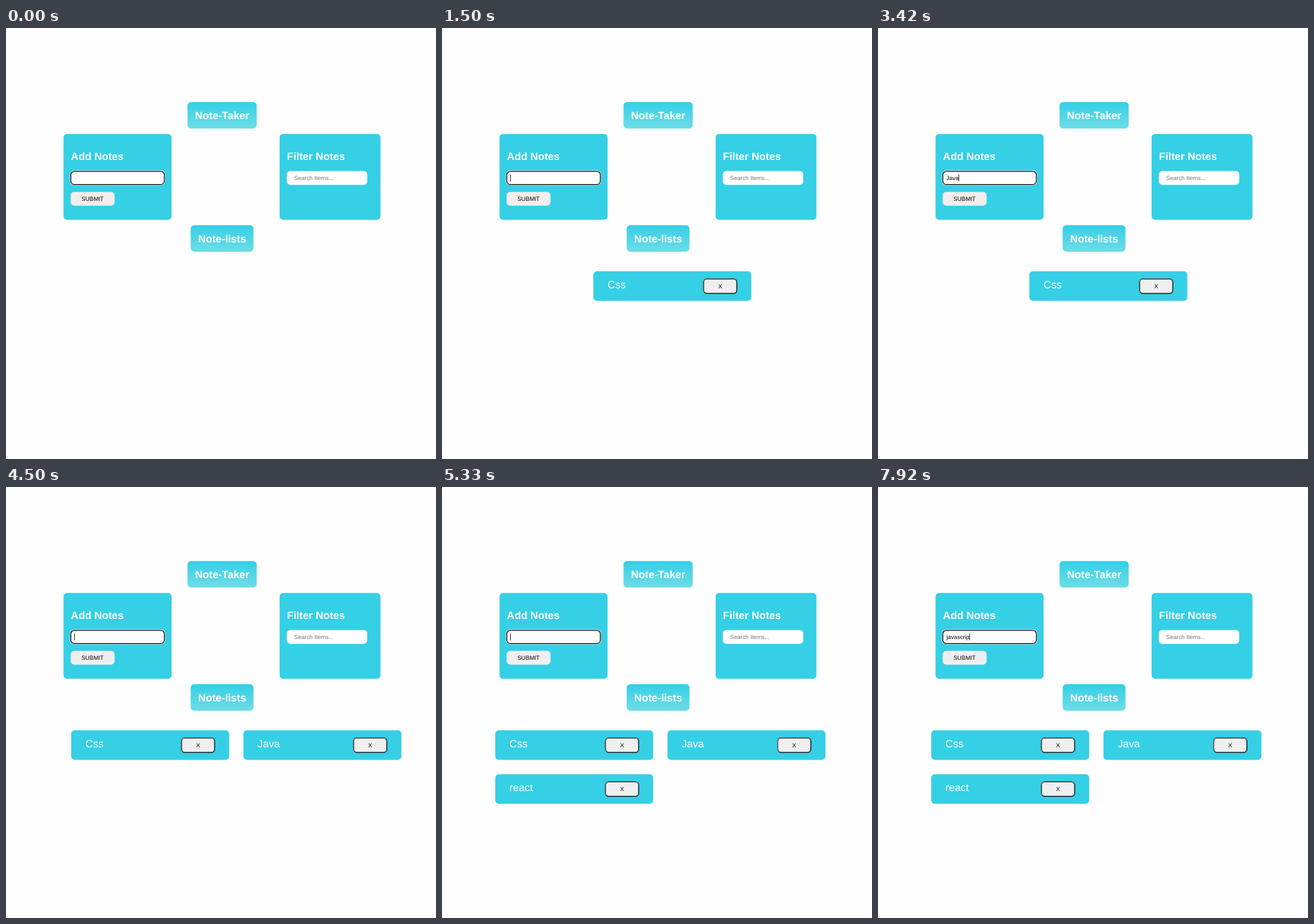
Write an HTML page that moves like this. It is 600x601 px and loops after 8000 ms.

```html
<!DOCTYPE html>
<html lang="en">
<head>
<meta charset="utf-8">
<title>Note-Taker</title>
<style>
  html, body { margin: 0; width: 100%; height: 100%; overflow: hidden; background: #fefefe; }
  svg { display: block; width: 600px; height: 601px; }
  text { font: 8.18px "Liberation Sans", Arial, sans-serif; fill: #000; text-rendering: geometricPrecision; }
  .head { font-size: 14.73px; font-weight: bold; fill: #fff; }
  .note { font-size: 14.73px; fill: #fff; }
  .hint { fill: #757575; }
  .mid { text-anchor: middle; }
  .menu text { font: 9.4px "Noto Sans", sans-serif; fill: #e4e5e5; }
  .panel { fill: #35cfe6; }
  .btn { fill: #efefef; }
</style>
</head>
<body>
<svg viewBox="0 0 600 601">
  <defs>
    <linearGradient id="fade" x2="0" y2="1">
      <stop stop-color="#33cfe6"/>
      <stop offset="1" stop-color="#6edde6"/>
    </linearGradient>
    <filter id="soft" x="-10%" y="-10%" width="120%" height="125%">
      <feDropShadow dx="0" dy="0.8" stdDeviation="0.8" flood-opacity="0.4"/>
    </filter>
  </defs>

  <rect x="253.3" y="103.2" width="96.5" height="37" rx="5" fill="url(#fade)"/>
  <text class="head mid" x="301.6" y="126.7">Note-Taker</text>

  <rect class="panel" x="80.3" y="147.8" width="150.7" height="119.7" rx="5"/>
  <text class="head" x="90.6" y="183.6">Add Notes</text>
  <rect x="89.2" y="198.6" width="133" height="20.9" rx="6" fill="#fff"/>
  <rect x="90.4" y="199.8" width="130.6" height="18.5" rx="5" fill="#fff" stroke="#101010" stroke-width="1.3"/>
  <text id="typed" x="95.4" y="211.9"></text>
  <rect id="caret" y="204.4" width="0.8" height="9.4"/>
  <rect class="btn" x="90.2" y="228.6" width="61.3" height="19.2" rx="5"/>
  <text class="mid" x="120.8" y="241.1">SUBMIT</text>

  <rect class="panel" x="381.8" y="147.8" width="140.7" height="119.7" rx="5"/>
  <text class="head" x="392" y="183.6">Filter Notes</text>
  <rect x="391.8" y="199.4" width="112.3" height="19.4" rx="5" fill="#fff"/>
  <text class="hint" x="402" y="212">Search Items...</text>

  <rect x="257.7" y="275" width="87.7" height="37" rx="5" fill="url(#fade)"/>
  <text class="head mid" x="301.6" y="298.5">Note-lists</text>

  <g id="cards"></g>

  <g id="menu" class="menu">
    <g fill="#262a2b" filter="url(#soft)">
      <path d="M149.4 224.6L155 219L160.6 224.6Z"/>
      <rect id="menuBox" x="142.7" y="224.2" height="49.4" rx="2.5"/>
    </g>
    <text x="150" y="241.9"></text>
    <text x="150" y="263.7"></text>
  </g>
</svg>
<script>
const LOOP = 8000;
const $ = id => document.getElementById(id);
const menus = {
  j: { width: 52, items: ['j', 'jhfguy'] },
  r: { width: 37.5, items: ['r', 'rea'] }
};

// time, typed text, caret shown, menu key, notes in the list
const steps = [
  [0, '', 0, '', 0],
  [500, '', 1, '', 0],
  [750, 'C', 1, '', 0],
  [1000, 'Cs', 1, '', 0],
  [1170, 'Css', 1, '', 0],
  [1500, '', 1, '', 1],
  [1830, '', 0, '', 1],
  [2420, '', 1, '', 1],
  [3000, 'J', 1, 'j', 1],
  [3170, 'Ja', 1, 'j', 1],
  [3250, 'Jav', 1, '', 1],
  [3420, 'Java', 1, '', 1],
  [3580, '', 1, '', 2],
  [3920, '', 0, '', 2],
  [4500, '', 1, '', 2],
  [4670, 'r', 1, 'r', 2],
  [4830, 're', 1, 'r', 2],
  [4920, 'rea', 1, '', 2],
  [5080, 'reac', 1, '', 2],
  [5170, 'react', 1, '', 2],
  [5330, '', 1, '', 3],
  [5750, '', 0, '', 3],
  [6420, '', 1, '', 3],
  [6830, 'j', 1, 'j', 3],
  [6920, 'ja', 1, 'j', 3],
  [7000, 'jav', 1, '', 3],
  [7080, 'java', 1, '', 3],
  [7250, 'javas', 1, '', 3],
  [7580, 'javasc', 1, '', 3],
  [7750, 'javascr', 1, '', 3],
  [7830, 'javascri', 1, '', 3],
  [7920, 'javascrip', 1, '', 3]
];

$('cards').innerHTML = ['Css', 'Java', 'react'].map(name => `<g>
  <rect class="panel" width="220.4" height="41.3" rx="5"/>
  <text class="note" x="19.8" y="23.6">${name}</text>
  <rect class="btn" x="153.9" y="10.7" width="46.2" height="20.2" rx="4.6" stroke="#111" stroke-width="1.25"/>
  <path d="M155.2 29.6Q153.9 28.3 153.9 26.3V15.3Q153.9 10.7 158.5 10.7H195.5Q197.6 10.7 198.8 12" fill="none" stroke="#666" stroke-width="1.25"/>
  <text class="mid" x="177" y="23.6">X</text>
</g>`).join('');
const cards = [...$('cards').children];
const menuRows = $('menu').querySelectorAll('text');
const leftEdge = [0, 211.2, 91, 74.3];

function show(el, on) {
  el.style.display = on ? '' : 'none';
}

function draw([, text, caret, key, count]) {
  $('typed').textContent = text;
  const width = text ? $('typed').getComputedTextLength() : 0;
  $('caret').setAttribute('x', 95.2 + width);
  show($('caret'), caret);

  const menu = menus[key];
  show($('menu'), menu);
  if (menu) {
    $('menuBox').setAttribute('width', menu.width);
    menuRows.forEach((row, i) => row.textContent = menu.items[i]);
  }

  cards.forEach((card, i) => {
    show(card, i < count);
    const x = leftEdge[count] + (i % 2) * 240.3;
    const y = 339.2 + Math.floor(i / 2) * 61.3;
    card.setAttribute('transform', `translate(${x} ${y})`);
  });
}

let current;
function tick() {
  const t = performance.now() % LOOP;
  const step = steps.findLast(s => s[0] <= t);
  if (step !== current) draw(current = step);
  requestAnimationFrame(tick);
}
tick();
</script>
</body>
</html>
```
